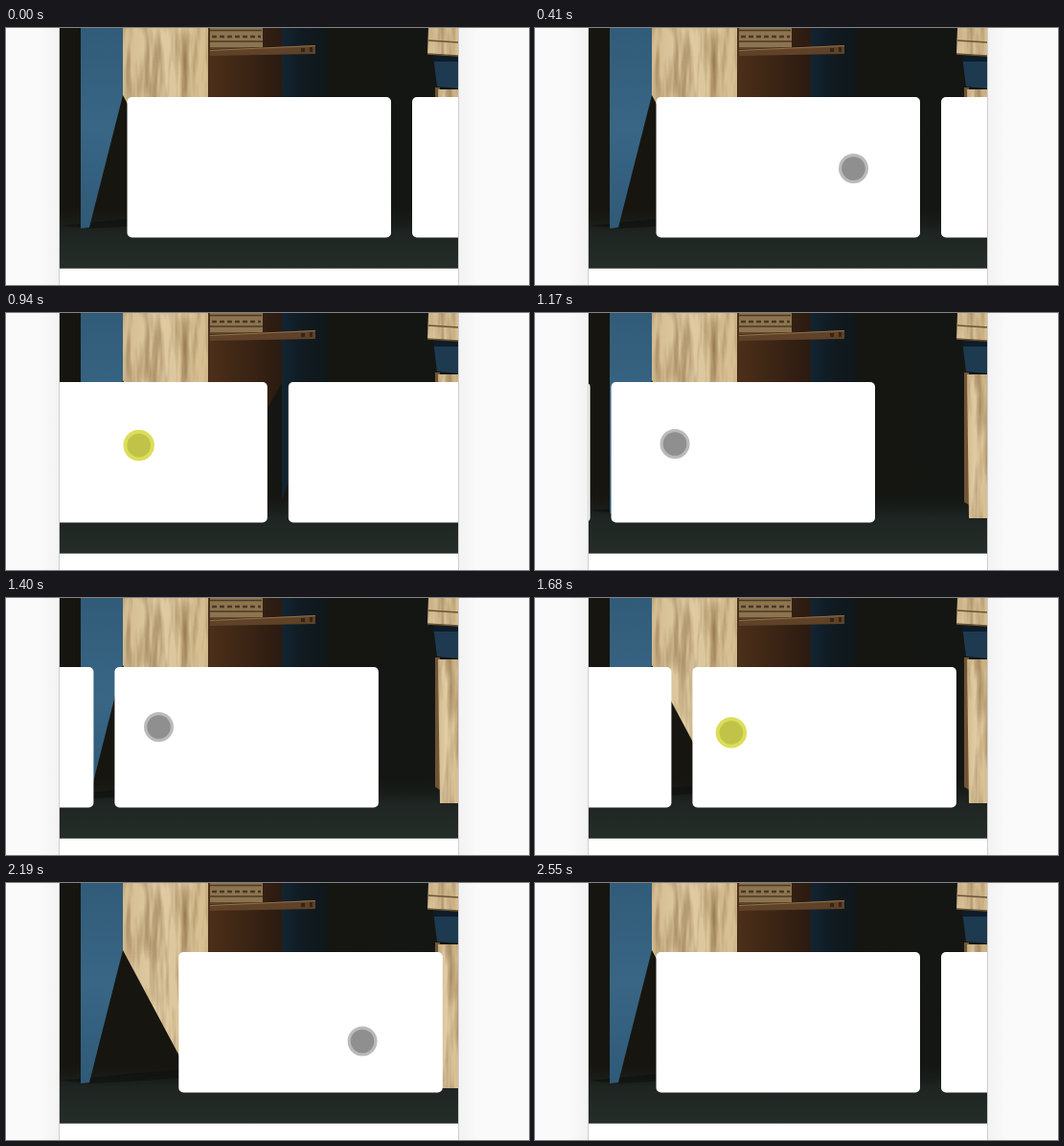
These frames come from a looping animation (546 px wide and 268 px high, 3.16 s). An HTML page:

```html
<!DOCTYPE html>
<html lang="en">
<head>
<meta charset="utf-8">
<title>Card carousel</title>
<style>
  html, body { margin: 0; width: 100%; height: 100%; overflow: hidden; background: #fafafa; }
  svg { display: block; }
</style>
</head>
<body>
<svg width="546" height="268" viewBox="0 0 546 268">
  <defs>
    <clipPath id="column"><path d="M56 0H472V268H56z"/></clipPath>
    <linearGradient id="shade"><stop stop-color="#fafafa"/><stop offset="1" stop-color="#f2f2f2"/></linearGradient>
    <linearGradient id="wall"><stop stop-color="#17150f"/><stop offset="1" stop-color="#141613"/></linearGradient>
    <linearGradient id="niche"><stop stop-color="#122432"/><stop offset=".5" stop-color="#101a20"/><stop offset="1" stop-color="#0f171a"/></linearGradient>
    <linearGradient id="floor" x2="0" y2="1"><stop stop-color="#1a201d" stop-opacity="0"/><stop offset=".4" stop-color="#1e2522"/><stop offset="1" stop-color="#252d29"/></linearGradient>
    <linearGradient id="blue" x2="0" y2="1"><stop stop-color="#315c79"/><stop offset=".5" stop-color="#386684"/><stop offset="1" stop-color="#2f5a78"/></linearGradient>
    <linearGradient id="inside"><stop stop-color="#4c2f19"/><stop offset=".55" stop-color="#3a2415"/><stop offset="1" stop-color="#2a1a10"/></linearGradient>
    <linearGradient id="oak"><stop stop-color="#d3bb90"/><stop offset=".4" stop-color="#e0cca4"/><stop offset="1" stop-color="#d6bd90"/></linearGradient>
    <filter id="grain" x="0" y="0" width="1" height="1" color-interpolation-filters="sRGB">
      <feTurbulence type="fractalNoise" baseFrequency=".1 .012" numOctaves="3" seed="4"/>
      <feColorMatrix values="0 0 0 0 .45  0 0 0 0 .31  0 0 0 0 .15  1.4 0 0 0 -.6"/>
      <feComposite operator="in" in2="SourceGraphic" result="lines"/>
      <feMerge><feMergeNode in="SourceGraphic"/><feMergeNode in="lines"/></feMerge>
    </filter>
  </defs>

  <path fill="url(#shade)" d="M36 0H56V268H36z"/>
  <path fill="url(#shade)" d="M36 0H56V268H36z" transform="matrix(-1 0 0 1 528 0)"/>
  <path fill="#fff" d="M56 0H472V268H56z"/>
  <path stroke="#cfcfcf" d="M55.5 0V268M472.5 0V268"/>

  <g clip-path="url(#column)">
    <path fill="url(#wall)" d="M56 0H472V250.500H56z"/>
    <path fill="url(#niche)" d="M288 0H335V72L288 195z"/>
    <path fill="url(#floor)" d="M56 190H472V250.500H56z"/>
    <path fill="#0d100d" opacity=".6" d="M56 206 180 194 208 202 90 209z"/>
    <path fill="url(#blue)" d="M78 0H122V70L87 208 78 209z"/>

    <path fill="url(#inside)" d="M211 0H288V73L212 205z"/>
    <path fill="url(#oak)" filter="url(#grain)" d="M122 0H211V214L199 214 122 70z"/>
    <path fill="#8c7450" d="M213 0H268V20L213 22z"/>
    <path stroke="#4d3a22" stroke-width="1.5" d="M213 2.5H267M213 14H268M213 21H267"/>
    <path stroke="#4a3820" stroke-width="2.5" stroke-dasharray="5 3" d="M215 9H266"/>
    <path fill="#5f4227" d="M213 23 323 18V27L213 29z"/>
    <path stroke="#927048" d="M213 23.500 323 18.500"/>
    <path fill="#33251a" d="M308 21H312V25H308zM317 20H320V25H317z"/>

    <path fill="#1d3a50" d="M446 29H472V63L450 61z"/>
    <path fill="#0e1c28" d="M446 29H472V35H446z"/>
    <path fill="#6f5534" d="M448 62H453V200L448 197z"/>
    <path fill="url(#oak)" filter="url(#grain)" d="M441 0H472V29L440 27z"/>
    <path stroke="#6d5231" stroke-width="1.5" d="M441 13 472 15M440 27 472 29"/>
    <path fill="url(#oak)" filter="url(#grain)" d="M451 64H472V214H453z"/>

    <g id="cards" fill="#fff">
      <rect x="126.5" y="72" width="275.5" height="146.5" rx="5"/>
      <rect x="424" y="72" width="275.5" height="146.5" rx="5"/>
    </g>
  </g>

  <g id="pointer">
    <circle id="ring"/>
    <circle id="dot" r="12.3"/>
  </g>
</svg>
<script>
const LOOP = 3160, ENTER = 260, LEAVE = 2470;
const CARD_STEP = 297.5, OVERSHOOT = 58, THROW_MS = 290, RETURN_MS = 370;

const linear = u => u;
const easeIn = u => u * u;
const easeOut = u => 1 - (1 - u) ** 2;

// Pointer strokes: each point is reached from the one before with its own easing.
const strokes = [
  { t: ENTER, x: 218, y: 270 },
  { t: 480, x: 345, y: 133, ease: easeOut },
  { t: 1000, x: 136, y: 138, ease: easeOut },
  { t: 1400, x: 159.5, y: 134.5, ease: linear },
  { t: 1890, x: 297.5, y: 152.5, ease: easeIn },
  { t: 2190, x: 371.5, y: 164.5, ease: linear },
  { t: 2420, x: 498, y: 274, ease: linear }
];

const drags = [
  { from: 587, to: 945, start: 0, rest: -CARD_STEP },
  { from: 1514, to: 1890, start: -CARD_STEP, rest: 0 }
];

const $ = id => document.getElementById(id);
const mix = (a, b, u) => a + (b - a) * u;

function pointerAt(t) {
  const next = strokes.findIndex((point, i) => i && t <= point.t);
  if (next < 0) return strokes.at(-1);
  const a = strokes[next - 1], b = strokes[next];
  const u = b.ease(Math.max(0, (t - a.t) / (b.t - a.t)));
  return { x: mix(a.x, b.x, u), y: mix(a.y, b.y, u) };
}

// Follows the pointer while held, then flies past the resting place and settles.
function cardShift(t) {
  const drag = drags.findLast(d => t >= d.from);
  if (!drag) return 0;
  const held = drag.start + pointerAt(Math.min(t, drag.to)).x - pointerAt(drag.from).x;
  if (t < drag.to) return held;
  const past = Math.sign(drag.rest - drag.start) * OVERSHOOT;
  const flight = t - drag.to;
  if (flight < THROW_MS) return mix(held, drag.rest + past, easeOut(flight / THROW_MS));
  return drag.rest + past * Math.max(0, 1 - (flight - THROW_MS) / RETURN_MS) ** 2.5;
}

function draw(now) {
  const t = now % LOOP;
  const pressed = drags.some(d => t >= d.from && t < d.to);
  const { x, y } = pointerAt(t);
  $('cards').setAttribute('transform', `translate(${cardShift(t)} 0)`);
  $('pointer').setAttribute('transform', `translate(${x} ${y})`);
  $('pointer').setAttribute('visibility', t >= ENTER && t < LEAVE ? 'visible' : 'hidden');
  $('ring').setAttribute('r', pressed ? 16.2 : 15.5);
  $('ring').setAttribute('fill', pressed ? '#dcdd58' : '#bababa');
  $('dot').setAttribute('fill', pressed ? '#c0c348' : '#8f8f8f');
  requestAnimationFrame(draw);
}
draw(0);
</script>
</body>
</html>
```
